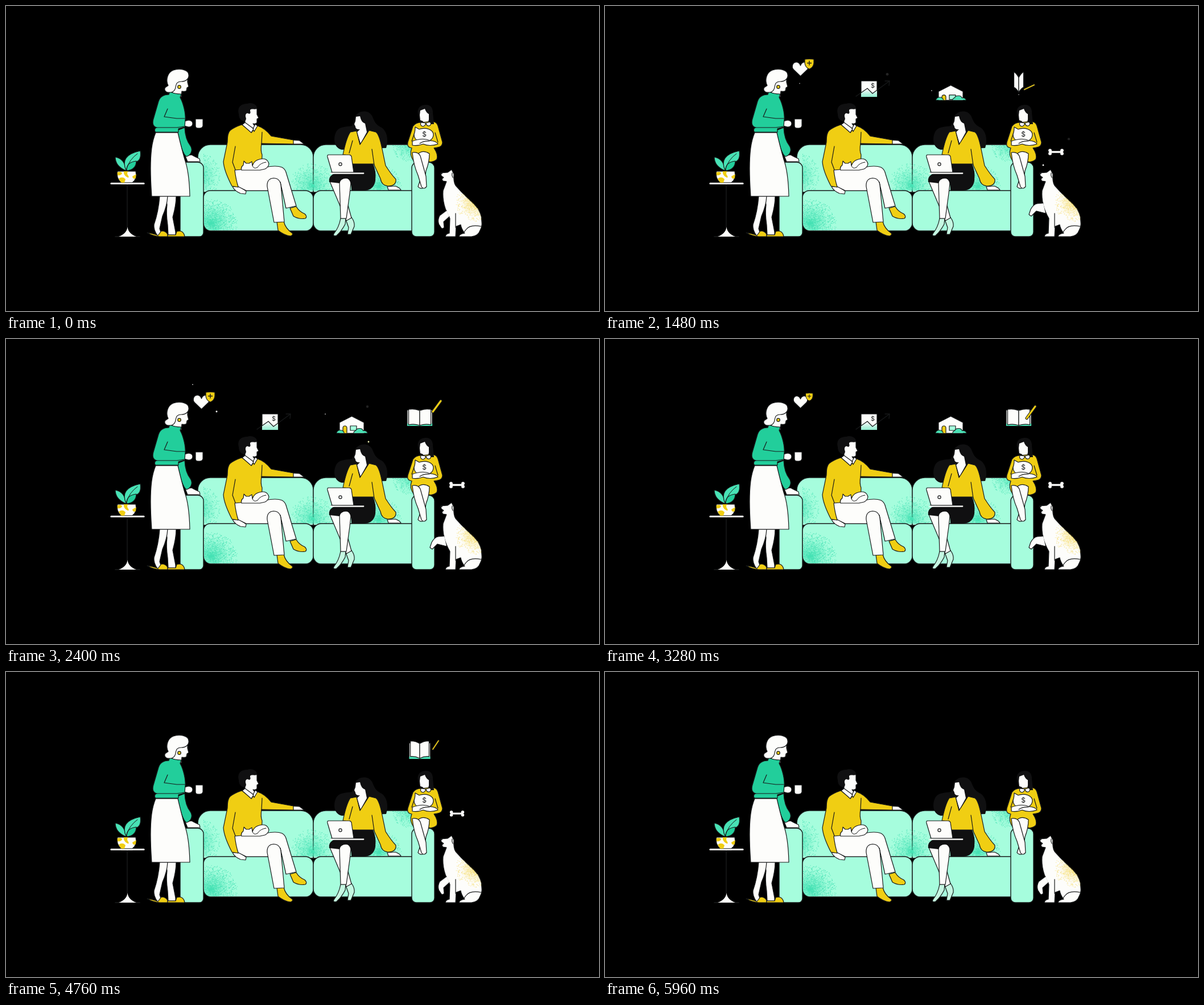
Write an HTML page with a canvas that moves like this. It is 1042 px wide and 537 px high and loops after 6000 ms.

```html
<!DOCTYPE html>
<html lang="en">
<head>
<meta charset="utf-8">
<title>Family on a sofa</title>
<style>
html, body { margin: 0; width: 100%; height: 100%; overflow: hidden; background: #000; }
canvas { display: block; width: 1042px; height: 537px; }
</style>
</head>
<body>
<canvas id="stage" width="1042" height="537"></canvas>
<script>
const W = 1042, H = 537, LOOP = 6000;
const WHITE = '#fdfdfb', MINT = '#a6fddd', TEAL = '#22ce9b', YELLOW = '#f0ce13';
const INK = '#17191a', HAIR = '#101011', LEAF = '#48e2b5', SOCK = '#c5f8e2', SAND = '#f6df78';

const screen = document.getElementById('stage').getContext('2d');
const backdrop = document.createElement('canvas');
backdrop.width = W;
backdrop.height = H;
let ctx = backdrop.getContext('2d');

let seed = 7;
function rand() {
  seed = (seed + 0x6D2B79F5) | 0;
  let n = Math.imul(seed ^ (seed >>> 15), 1 | seed);
  n = (n + Math.imul(n ^ (n >>> 7), 61 | n)) ^ n;
  return ((n ^ (n >>> 14)) >>> 0) / 4294967296;
}

function shape(d, fill, line = INK, width = 1.2) {
  const p = new Path2D(d);
  if (fill) { ctx.fillStyle = fill; ctx.fill(p); }
  if (line) {
    ctx.strokeStyle = line;
    ctx.lineWidth = width;
    ctx.lineJoin = ctx.lineCap = 'round';
    ctx.stroke(p);
  }
}
const lines = (d, width = 1.2) => shape(d, null, INK, width);

function dot(x, y, r, fill, line) {
  ctx.beginPath();
  ctx.arc(x, y, r, 0, 7);
  if (fill) { ctx.fillStyle = fill; ctx.fill(); }
  if (line) { ctx.strokeStyle = line; ctx.lineWidth = 1.2; ctx.stroke(); }
}

function box(x, y, w, h, radii, fill) {
  ctx.beginPath();
  ctx.roundRect(x, y, w, h, radii);
  ctx.fillStyle = fill;
  ctx.fill();
  ctx.strokeStyle = INK;
  ctx.lineWidth = 1.4;
  ctx.stroke();
}

// Soft glow with speckles that thin out from its centre
function spray(clip, x, y, rx, ry, count, color) {
  ctx.save();
  ctx.clip(new Path2D(clip));
  ctx.translate(x, y);
  ctx.save();
  ctx.scale(rx, ry);
  const glow = ctx.createRadialGradient(0, 0, 0, 0, 0, 0.9);
  glow.addColorStop(0, color);
  glow.addColorStop(1, color + '00');
  ctx.fillStyle = glow;
  ctx.globalAlpha = 0.6;
  ctx.fillRect(-1, -1, 2, 2);
  ctx.restore();
  ctx.fillStyle = color;
  for (let i = 0; i < count; i++) {
    const a = rand() * Math.PI * 2, r = rand() * 1.1;
    ctx.fillRect(Math.cos(a) * r * rx, Math.sin(a) * r * ry, 1, 1);
  }
  ctx.restore();
}

function dollar(x, y, size) {
  ctx.fillStyle = INK;
  ctx.font = `${size}px Inter, Arial, sans-serif`;
  ctx.textAlign = 'center';
  ctx.textBaseline = 'middle';
  ctx.fillText('$', x, y);
}

function sofa() {
  box(337, 244, 203, 84, [22, 22, 0, 0], MINT);
  box(540, 244, 182, 84, [22, 0, 0, 0], MINT);
  const back = 'M347 245H700Q721 245 721 275V325H347Z';
  spray(back, 343, 298, 30, 36, 700, LEAF);
  spray(back, 538, 316, 36, 36, 900, LEAF);
  spray(back, 655, 316, 36, 34, 1000, LEAF);
  spray(back, 713, 246, 33, 26, 700, LEAF);
  box(306, 275, 41, 131, [0, 10, 7, 0], MINT);
  box(347, 325, 193, 71, [12, 14, 14, 14], MINT);
  box(540, 325, 176, 71, [14, 0, 0, 14], MINT);
  spray('M348 326H538V395H362Q348 395 348 382Z', 360, 382, 42, 38, 1900, LEAF);
  box(713, 275, 40, 131, [10, 10, 8, 8], MINT);
}

function plant() {
  shape('M213 314V390', null, '#111213', 2);
  shape('M192 406H235', null, '#1b1c1c', 1.6);
  shape('M213.5 389Q215 401 229 406H198Q212 401 213.5 389Z', WHITE, null);
  shape('M185 312.5H242', null, WHITE, 3.2);
  shape('M211 290Q192 282 192 266Q209 269 211 290Z', LEAF);
  shape('M211 289Q199 263 236 255Q239 274 225 275Q216 279 211 289Z', LEAF);
  shape('M212 290Q211 275 229 273Q229 288 212 290Z', TEAL);
  lines('M212 286Q217 270 231 260', 1);
  const pot = 'M196 291H228Q231 304 222 311H203Q193 304 196 291Z';
  shape(pot, WHITE);
  ctx.save();
  ctx.clip(new Path2D(pot));
  shape('M195 293Q203 290 204 295Q201 299 196 298ZM207 291H215Q211 294 215 299Q217 304 212 301Q206 297 207 291ZM198 304Q205 299 210 305L208 311H202ZM222 300L229 296V303Q223 306 222 300Z', YELLOW, null);
  ctx.restore();
}

function grandmother() {
  shape('M281 335H299Q299 350 293 372L298 398V403H285L284 385Q281 365 283 350Z', WHITE);
  shape('M270 335H284Q283 352 275 370L270 392L274 404H266Q259 394 260 385Q268 362 270 335Z', WHITE);
  shape('M248 399Q260 401 267 404L273 396Q281 396 284 402V406H270Q257 405 248 399Z', YELLOW);
  shape('M284 403H298L300 397Q309 394 313 402L314 406H284Z', YELLOW);
  shape('M315 264L326 262Q333 266 340 269L341 274H319Z', WHITE);
  shape('M301 219L314 214Q315 235 324 246C329 254 325 263 317 265C310 260 304 235 301 219Z', TEAL);
  shape('M263 223H302Q307 245 314 270Q322 292 323 335H256Q252 280 256 250Q258 235 263 223Z', WHITE);
  shape('M298 128H319V134L321 142L318 144L317 149Q316 151 309 150L308 160H290Z', WHITE);
  shape('M313 203L321 201Q328 202 328 207Q328 213 321 213L313 211Z', WHITE);
  shape('M333 199H346V211Q345 215 341 215H337Q333 215 333 211Z', WHITE);
  shape('M288 150C293 154 301 155 308 155L306 161C312 172 316 190 315 200L314 213L303 216V222H263C260 220 261 215 265 214C258 212 257 206 259 199L268 168C271 159 278 156 286 156Z', TEAL);
  lines('M284 181L278 195L300 198H314M265 214H300Q308 213 313 212');
  shape('M321 121C322 127 317 133 308 133C300 133 299 137 298 143C297 150 291 153 287 152C282 153 278 149 279 145C280 142 283 142 285 140C280 130 284 117 294 113C305 109 321 112 321 121Z', WHITE);
  dot(304.5, 142.5, 2.8, YELLOW, INK);
}

function father() {
  shape('M499 356L510 353Q515 362 525 366Q530 371 526 374Q515 376 505 370Z', YELLOW);
  shape('M476 380L488 379Q491 392 503 400Q505 403 500 405Q489 404 478 395Z', YELLOW);
  shape('M504 236L516 237L524 243H504Z', WHITE);
  shape('M398 318H410L422 326L421 331L412 330Q402 326 398 318Z', WHITE);
  shape('M414 209Q402 213 394 219Q389 223 389 240L382 274Q383 290 397 317L408 319L403 289H449L450 262Q447 255 449 242L505 243V236L466 229Q455 215 442 211Z', YELLOW);
  lines('M403 247L398 275L404 291M450 222L449 243');
  shape('M402 289L455 284Q475 280 485 284Q491 287 493 296L510 352L492 356L482 310L462 325H422L408 318Q404 306 402 289Z', WHITE);
  shape('M471 381L459 318Q458 304 470 303Q481 303 483 315L489 380Z', WHITE);
  shape('M414 289Q412 284 417 280L418 273L422 277H427L432 274L433 281Q436 272 445 270Q459 266 462 278Q461 284 455 287L446 289Z', WHITE);
  lines('M433 281Q435 288 442 284Q447 276 457 275', 1);
  shape('M420 184L436 179L441 181V191L444 197L441 199V205Q440 208 434 207L438 213L432 222L416 210L420 204Z', WHITE);
  shape('M420 205L415 209L431 223L435 216ZM438 208L442 211L436 221L434 216Z', WHITE);
  shape('M409 190C406 178 413 172 424 172C432 169 442 174 441 181C436 183 432 180 429 183C429 187 431 189 427 190C424 187 420 190 421 195C422 198 423 200 419 203C412 202 409 197 409 190Z', HAIR, null);
}

function mother() {
  shape('M612 198C616 184 636 181 643 193C648 203 648 208 660 214C671 222 672 238 668 250L590 253C576 250 574 232 581 220C588 211 600 213 608 211Q612 205 612 198Z', HAIR, null);
  shape('M597 376L607 372Q613 380 612 388L606 402H600L602 390Z', SOCK);
  shape('M569 309Q575 302 588 304L607 373L598 378Z', WHITE);
  shape('M588 374H597L596 384Q590 396 581 404Q574 406 576 401Q585 390 588 374Z', SOCK);
  shape('M586 311Q588 303 598 303Q606 304 606 312L604 330L598 374H588Z', WHITE);
  shape('M607 278H645Q651 290 649 308Q646 324 630 325H607Q607 304 597 303Q587 304 586 312L568 310Q566 298 580 294L607 292Z', HAIR, null);
  shape('M615 195L622 194Q624 205 631 207L634 222L623 242L617 222L622 217Q614 218 614 212L612 208L614 203Z', WHITE, null);
  shape('M670 318L684 317Q692 320 694 324H672Z', WHITE);
  shape('M605 222L616 220L622 244L638 219L650 222Q656 226 661 252L667 281Q678 298 685 305Q686 317 671 317Q660 316 658 304L646 278H607L596 262H592Q598 232 605 222Z', YELLOW);
  lines('M609 237L603 259M643 252L647 280');
  shape('M567 262H603Q606 262 607 265L611 293H573L565 266Q564 262 567 262Z', WHITE);
  dot(587.5, 278.5, 2.6, null, INK);
  shape('M571 294.5H628', null, WHITE, 2.6);
  lines('M571 292.8H628', 0.8);
}

function girl() {
  shape('M724 190C722 178 730 174 738 174C748 174 751 182 750 192L752 207L742 208L727 205Z', HAIR, null);
  shape('M728 184L736 181Q738 188 744 191L743 200L741 207H733V203L728 201L727 192Z', WHITE, null);
  shape('M729 205L748 203Q757 204 759 211L767 240Q767 248 758 249L752 250Q760 262 757 270Q750 276 742 274H717Q708 262 713 250Q704 249 706 240L715 212Q720 205 729 205Z', YELLOW);
  lines('M718 223L713 238M754 223L759 240');
  shape('M729 205Q727 211 733 212Q738 210 737 206ZM738 206Q739 212 744 211Q748 209 746 204Z', WHITE);
  shape('M743 186L750 188L752 208H747Q743 203 743 195Z', HAIR, null);
  shape('M722 262Q732 252 744 260Q744 275 738 290L734 320Q728 323 724 318L730 300Q722 280 722 262Z', WHITE);
  shape('M714 258Q724 256 728 264L738 300L739 318Q734 324 730 318L724 298Q716 280 714 258Z', WHITE);
  shape('M719 213L726 217C737 213 751 217 751 227C750 236 744 239 734 239C723 239 717 234 717 226Q719 221 719 213Z', WHITE);
  dollar(735, 226.5, 12);
  shape('M714 238Q733 231 745 237Q757 238 759 243Q745 248 733 243Q722 247 714 245Z', WHITE);
  lines('M727 242Q734 237 744 238');
}

function dog() {
  const body = 'M764 294L776 293L783 288L787 296Q786 310 790 316L800 327L826 353Q836 364 836 380Q837 388 833 395Q830 405 818 406H796Q797 401 806 400Q800 392 799 385L791 388L790 406H772Q773 401 779 400L780 374Q766 350 768 325L774 309L768 308Q764 305 769 302L765 299Z';
  shape(body, WHITE);
  spray(body, 824, 346, 31, 30, 750, SAND);
  lines('M835 388Q815 384 808 394Q804 400 799 402M785 302Q783 298 784 294M790 365V390');
  dot(765.5, 294.5, 1.4, INK);
}

function paintBackdrop() {
  ctx.fillStyle = '#000';
  ctx.fillRect(0, 0, W, H);
  sofa();
  plant();
  grandmother();
  father();
  mother();
  girl();
  dog();
}

const clamp = v => Math.max(0, Math.min(1, v));
const mix = (a, b, k) => a + (b - a) * k;
const span = (t, a, b) => clamp((t - a) / (b - a));
const smooth = k => k * k * (3 - 2 * k);
const pop = k => k <= 0 ? 0 : 1 + 2.7 * Math.pow(k - 1, 3) + 1.7 * Math.pow(k - 1, 2);

// Overshooting entry, accelerating exit
const size = (t, a, b, c, d) => Math.max(0, pop(span(t, a, b)) * (1 - span(t, c, d) ** 2));

function at(x, y, sx, sy, draw) {
  if (sx < 0.01 || sy < 0.01) return;
  ctx.save();
  ctx.translate(x, y);
  ctx.scale(sx, sy);
  draw();
  ctx.restore();
}

function heart(t) {
  const s = size(t, 250, 700, 3150, 3500), b = size(t, 450, 900, 3120, 3460);
  at(343.5, 111, s, s, () =>
    shape('M0 12.5L-12 1C-17 -5 -13 -13 -6 -12Q-2 -11 0 -6Q2 -11 6 -12C13 -13 17 -5 12 1Z', WHITE));
  at(359, 101.5, b, b, () => {
    shape('M-8 -7.5Q0 -9 8 -7.5V-1Q7 7 0 9.5Q-7 7 -8 -1Z', YELLOW);
    lines('M-3.5 -1H3.5M0 -4.5V2.5', 1.4);
  });
}

function chart(t) {
  const s = size(t, 500, 950, 3550, 3900);
  at(464, 146, s, s, () => {
    shape('M-14 -14H14V14H-14Z', WHITE);
    const area = 'M-14 7L-3 -1L6 8L14 2V14H-14Z';
    const shade = ctx.createLinearGradient(0, 0, 0, 14);
    shade.addColorStop(0, WHITE);
    shade.addColorStop(1, '#8feccf');
    shape(area, shade, null);
    dollar(6.5, -5, 11);
    const k = smooth(span(t, 850, 1300)) * 74;
    ctx.setLineDash([k, 200]);
    lines('M-23 13L-3 -1L6 8L36 -14', 1.3);
    ctx.setLineDash([]);
    if (k > 72) lines('M28 -14H36L35 -6', 1.3);
  });
}

function house(t) {
  const up = smooth(span(t, 1150, 1570)) * (1 - smooth(span(t, 3830, 4150)));
  const bush = pop(span(t, 1330, 1800)) * (1 - span(t, 3980, 4260) ** 2);
  if (up <= 0 && bush <= 0) return;
  ctx.save();
  ctx.beginPath();
  ctx.rect(560, 100, 100, 65.5);
  ctx.clip();
  const drop = (1 - up) * 31;
  at(0, drop, 1, 1, () => {
    shape('M607.5 136L629 147V180H586V147Z', WHITE);
    shape('M592 167V157Q592 153 595.5 153Q599 153 599 157V167Z', YELLOW);
    shape('M605 153H616V161H605Z', MINT);
  });
  const sx = 0.55 + 0.45 * bush;
  at(607.5, 165.5, sx, Math.max(0, bush), () => {
    shape('M-27 1Q-26 -5 -20 -5Q-14 -5 -13 1Z', LEAF);
    shape('M3 1Q4 -4 7 -4Q8 -8 14 -8Q19 -8 20 -4Q27 -5 28 1Z', LEAF);
  });
  ctx.restore();
}

// Time, tip x, tip y, end x, end y
const pencilKeys = [
  [1350, 734, 152, 740, 149], [1480, 737, 147, 754, 139], [1850, 741, 140, 756, 119],
  [2150, 743, 138, 757, 117], [2400, 750, 128, 764, 109], [2750, 741, 139, 756, 118],
  [4420, 741, 141, 756, 121], [4600, 748, 130, 762, 109], [4760, 750, 136, 760, 121],
  [5050, 752, 139, 754, 136]
];

function pencil(t) {
  if (t < pencilKeys[0][0] || t > 5050) return;
  const i = pencilKeys.findIndex(k => k[0] >= t);
  const b = pencilKeys[i], a = pencilKeys[Math.max(0, i - 1)];
  const k = i ? smooth((t - a[0]) / (b[0] - a[0])) : 0;
  const [x1, y1, x2, y2] = [1, 2, 3, 4].map(n => mix(a[n], b[n], k));
  const width = t < 1850 ? mix(1.5, 3, span(t, 1400, 1850)) : mix(3, 1.4, span(t, 4550, 4800));
  const d = `M${x1} ${y1}L${x2} ${y2}`;
  lines(d, width + 2);
  shape(d, null, YELLOW, width);
}

function book(t) {
  const open = smooth(span(t, 1280, 1720)) * (1 - span(t, 4550, 5080) ** 2);
  if (open > 0.01) {
    at(727, 153, 1, clamp(open * 3), () => {
      const lift = (1 - open) * 14, w = 19.5 * open, cover = 22 * open;
      if (open > 0.6) {
        shape(`M${-cover} -28H${cover}V0H${-cover}Z`, WHITE);
        shape(`M${-cover} -4H${cover}V0H${-cover}Z`, LEAF, null);
      }
      for (const x of [-w, w]) {
        shape(`M0 -27Q${x * 0.5} ${-31 - lift / 2} ${x} ${-29 - lift}V${-2 - lift}Q${x * 0.5} ${-4 - lift / 2} 0 -1Z`, WHITE);
      }
    });
  }
  pencil(t);
}

function bone(t) {
  const s = size(t, 950, 1350, 4650, 5120);
  const y = 257 - 10 * (1 - smooth(span(t, 950, 1350))) - 13 * smooth(span(t, 4500, 4960));
  at(792.5, y, s, s, () => {
    for (const x of [-10.5, 10.5]) for (const dy of [-2.7, 2.7]) dot(x, dy, 2.9, WHITE);
    ctx.fillStyle = WHITE;
    ctx.fillRect(-10, -1.7, 20, 3.4);
  });
}

const pawDown = [774, 360, 762, 369, 758, 377, 765, 391, 770, 390, 769, 380, 779, 371];
const pawUp = [770, 347, 759, 348, 753, 349, 745, 367, 749, 370, 758, 361, 774, 365];

function paw(t) {
  const k = smooth(span(t, 780, 1120)) * (1 - smooth(span(t, 4380, 4680)));
  const p = pawDown.map((v, i) => mix(v, pawUp[i], k));
  shape(`M${p[0]} ${p[1]}L${p[2]} ${p[3]}Q${p[4]} ${p[5]} ${(p[4] + p[6]) / 2 - 1} ${(p[5] + p[7]) / 2}L${p[6]} ${p[7]}Q${p[6] + 2} ${p[7] + 2} ${p[8]} ${p[9]}L${p[10]} ${p[11]}L${p[12]} ${p[13]}`, WHITE);
}

// x, y, start, end, radius, colour
const sparks = [
  [342, 137, 1150, 1650, 0.9, '#aaa'], [328, 80, 2050, 2800, 0.9, '#ccc'],
  [370, 128, 2000, 2750, 1.5, WHITE], [496, 120, 1200, 1800, 2.4, '#242424'],
  [574, 149, 1250, 1700, 0.9, '#bbb'], [561, 132, 2100, 2750, 0.9, '#bbb'],
  [637, 181, 2050, 2750, 1.4, '#ecefb0'], [635, 119, 2050, 2750, 2.2, '#222'],
  [815, 234, 1200, 1800, 2.2, '#202020'], [770, 280, 1200, 1800, 1.3, WHITE],
  [727, 156, 1300, 1650, 0.9, '#888']
];

function sparkle(t) {
  for (const [x, y, a, b, r, color] of sparks) {
    const k = span(t, a, b);
    if (k > 0 && k < 1) dot(x, y + 4 * (0.5 - k), r * Math.sqrt(Math.sin(Math.PI * k)), color);
  }
}

function render(t) {
  ctx.drawImage(backdrop, 0, 0);
  paw(t);
  heart(t);
  chart(t);
  house(t);
  book(t);
  bone(t);
  sparkle(t);
}

paintBackdrop();
ctx = screen;
const start = performance.now();
function frame() {
  render((performance.now() - start) % LOOP);
  requestAnimationFrame(frame);
}
frame();
</script>
</body>
</html>
```
